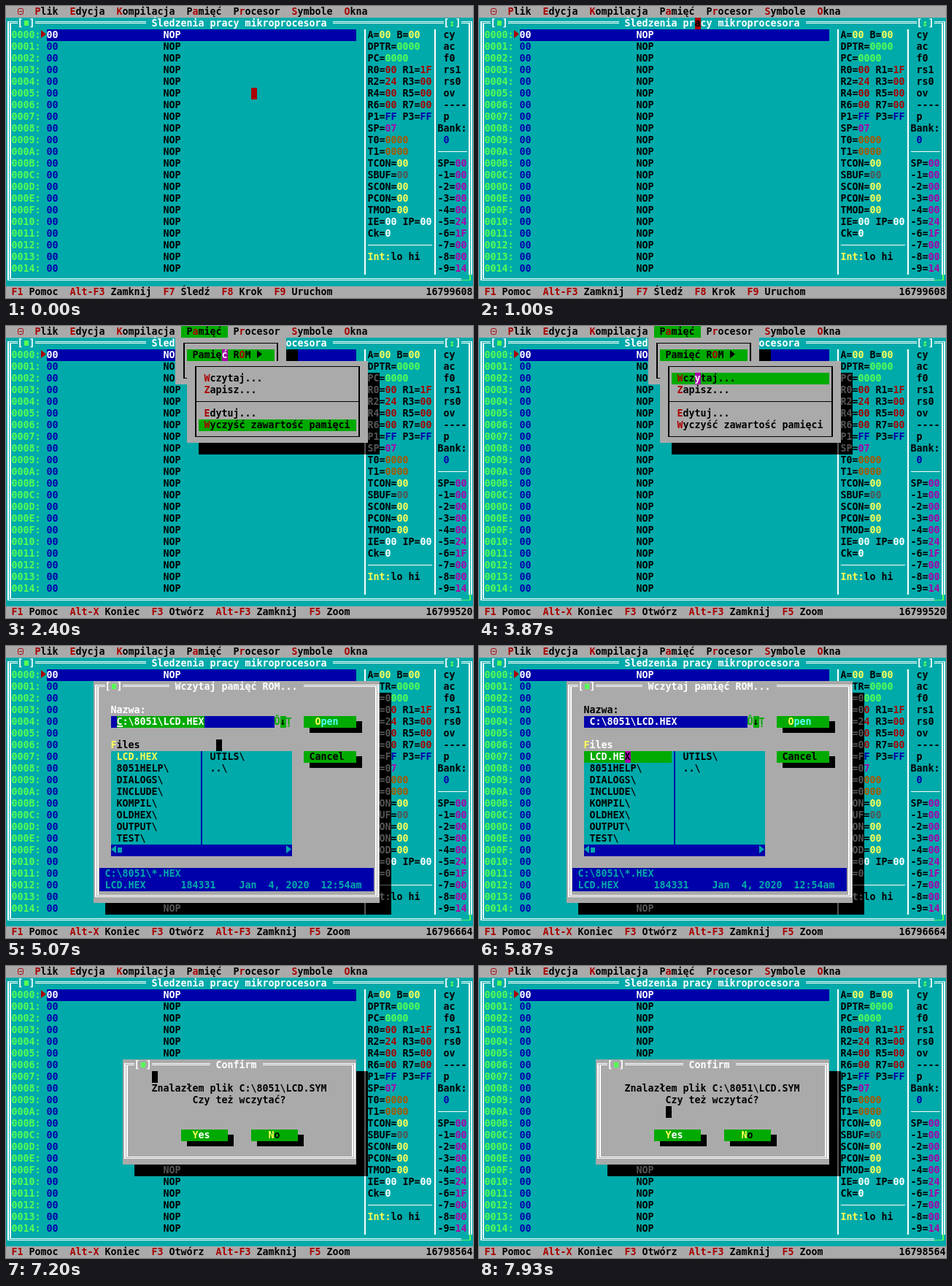
An HTML page with a canvas that plays this animation: 640x400 px, repeating every 8000 ms.

```html
<!DOCTYPE html>
<html lang="pl">
<head>
<meta charset="utf-8">
<title>Text mode debugger</title>
<style>
  html, body { margin: 0; width: 100%; height: 100%; overflow: hidden; background: #0aa; }
  canvas { display: block; width: 640px; height: 400px; }
</style>
</head>
<body>
<canvas id="screen" width="640" height="400"></canvas>
<script>
const COLS = 80, ROWS = 25, CW = 8, CH = 16;
const LOOP = 8000, TICK = 1000 / 15;

const PALETTE = ['#000', '#00a', '#0a0', '#0aa', '#a00', '#a0a', '#a50', '#aaa',
                 '#555', '#55f', '#5f5', '#5ff', '#f55', '#f5f', '#ff5', '#fff'];
const BLACK = 0, BLUE = 1, GREEN = 2, CYAN = 3, RED = 4, MAGENTA = 5, BROWN = 6, GRAY = 7,
      DARK = 8, LIME = 10, AQUA = 11, YELLOW = 14, WHITE = 15;

// Line characters: directions, then the joint of each stroke inside the cell.
const LINES = {
  '─': ['lr', 3, 7], '│': ['ud', 3, 7], '┌': ['rd', 3, 7], '┐': ['ld', 3, 7],
  '└': ['ru', 3, 7], '┘': ['lu', 3, 7], '├': ['udr', 3, 7], '┤': ['udl', 3, 7],
  '═': ['lr', 3, 5, 3, 7], '║': ['ud', 2, 7, 5, 7],
  '╔': ['rd', 2, 5, 5, 7], '╗': ['ld', 5, 5, 2, 7],
  '╚': ['ru', 2, 7, 5, 5], '╝': ['lu', 5, 7, 2, 5]
};
const BLOCKS = { '■': [1, 4, 6, 7], '▄': [0, 7, 8, 9], '▀': [0, 0, 8, 7] };

// Mouse pointer: tick, column, row.
const MOUSE = [
  [0, 42, 7], [7, 41, 7], [9, 40, 6],
  [12, 39, 5], [13, 38, 3], [14, 38, 2], [15, 37, 1], [16, 36, 0], [17, 35, 0],
  [22, 34, 0], [26, 36, 1], [27, 37, 2],
  [43, 38, 3], [44, 38, 5], [45, 39, 6], [48, 39, 7],
  [51, 39, 6], [52, 38, 5], [53, 38, 4], [54, 37, 4],
  [64, 38, 4], [65, 41, 5], [66, 45, 5], [67, 50, 6], [68, 52, 6], [69, 53, 6],
  [71, 51, 6], [72, 48, 7], [73, 44, 7], [74, 40, 7], [75, 37, 8], [76, 36, 8],
  [78, 35, 8], [79, 34, 8], [80, 32, 8], [81, 30, 8], [82, 28, 9], [83, 27, 9], [84, 26, 9], [85, 25, 9],
  [115, 26, 9], [116, 27, 10], [117, 29, 11], [118, 31, 11], [119, 32, 12]
];
const MEMORY = [[0, 16799608], [19, 16799564], [36, 16799520], [60, 16799608], [61, 16796664], [108, 16798564]];

const ctx = document.getElementById('screen').getContext('2d');
const cells = Array.from({ length: COLS * ROWS }, () => ({ ch: ' ', fg: 0, bg: 0 }));
const cell = (c, r) => cells[r * COLS + c];
const latest = (table, tick) => table.filter(step => step[0] <= tick).pop();

function fill(c, r, w, h, bg, ch = ' ', fg = BLACK) {
  for (let y = r; y < r + h; y++)
    for (let x = c; x < c + w; x++) Object.assign(cell(x, y), { ch, fg, bg });
}

// Text between tildes takes the hot colour; the background stays.
function put(c, r, text, fg = BLACK, hot = RED) {
  let isHot = false;
  for (const ch of text) {
    if (ch === '~') isHot = !isHot;
    else Object.assign(cell(c++, r), { ch, fg: isHot ? hot : fg });
  }
}

function tint(c, r, w, bg) {
  for (let x = c; x < c + w; x++) cell(x, r).bg = bg;
}

function shadow(c, r, w, h) {
  const dim = (x, y) => Object.assign(cell(x, y), { fg: DARK, bg: BLACK });
  for (let y = r + 1; y <= r + h; y++) { dim(c + w, y); dim(c + w + 1, y); }
  for (let x = c + 2; x < c + w; x++) dim(x, r + h);
}

function border(c, r, w, h, set, fg) {
  const [tl, tr, bl, br, hor, ver] = set;
  put(c, r, tl + hor.repeat(w - 2) + tr, fg);
  for (let y = r + 1; y < r + h - 1; y++) { put(c, y, ver, fg); put(c + w - 1, y, ver, fg); }
  put(c, r + h - 1, bl + hor.repeat(w - 2) + br, fg);
}

function makeWindow(c, r, w, h, bg, titleCol, title) {
  fill(c, r, w, h, bg);
  border(c, r, w, h, '╔╗╚╝═║', WHITE);
  put(c + 2, r, '[~■~]', WHITE, LIME);
  put(titleCol - 1, r, ` ${title} `, WHITE);
}

function menuBox(c, r, w, h) {
  shadow(c, r, w, h);
  fill(c, r, w, h, GRAY);
  border(c + 1, r, w - 2, h, '┌┐└┘─│', BLACK);
}

function button(c, r, w, textCol, text, fg) {
  fill(c, r, w, 1, GREEN);
  put(textCol, r, text, fg, YELLOW);
  put(c + w, r, '▄');
  put(c + 1, r + 1, '▀'.repeat(w));
}

function desktop(tick) {
  fill(0, 0, COLS, 1, GRAY);
  put(2, 0, '~⊟~  ~P~lik  ~E~dycja  ~K~ompilacja  P~a~mięć  P~r~ocesor  ~S~ymbole  ~O~kna');

  makeWindow(0, 1, 80, 23, CYAN, 25, 'Śledzenia pracy mikroprocesora');
  put(75, 1, '[~↕~]', WHITE, LIME);
  put(78, 23, '─┘', LIME);

  for (let i = 0; i < 21; i++) {
    put(1, i + 2, i.toString(16).toUpperCase().padStart(4, '0') + ':', LIME);
    put(7, i + 2, '00', i ? BLUE : WHITE);
    put(27, i + 2, 'NOP', i ? BLACK : WHITE);
    put(61, i + 2, '│', WHITE);
    put(73, i + 2, '│', WHITE);
  }
  tint(7, 2, 53, BLUE);
  put(6, 2, '►', RED);

  const registers = [
    ['A=~00~ B=~00~', YELLOW], ['DPTR=~0000~', LIME], ['PC=~0000~', LIME],
    ['R0=~00~ R1=~1F~', RED], ['R2=~24~ R3=~00~', RED], ['R4=~00~ R5=~00~', RED], ['R6=~00~ R7=~00~', RED],
    ['P1=~FF~ P3=~FF~', BLUE], ['SP=~07~', MAGENTA], ['T0=~0000~', BROWN], ['T1=~0000~', BROWN],
    ['TCON=~00~', YELLOW], ['SBUF=~00~', DARK], ['SCON=~00~', YELLOW], ['PCON=~00~', YELLOW],
    ['TMOD=~00~', YELLOW], ['IE=~00~ IP=~00~', WHITE], ['Ck=~0~', WHITE],
    ['~───────────~', WHITE], ['~Int:~lo hi', YELLOW]
  ];
  registers.forEach(([text, hot], i) => put(62, i + 2, text, BLACK, hot));

  ['cy', 'ac', 'f0', 'rs1', 'rs0', 'ov', '----', 'p'].forEach((flag, i) => put(75, i + 2, flag));
  put(74, 10, 'Bank:');
  put(75, 11, '0', BLUE);
  put(74, 12, '─────', WHITE);
  ['00', '00', '00', '00', '00', '24', '1F', '00', '00', '14'].forEach((value, i) =>
    put(74, i + 13, `${i ? '-' + i : 'SP'}=~${value}~`, BLACK, MAGENTA));

  fill(0, 24, COLS, 1, GRAY);
  put(1, 24, tick < 19
    ? '~F1~ Pomoc  ~Alt-F3~ Zamknij  ~F7~ Śledź  ~F8~ Krok  ~F9~ Uruchom'
    : '~F1~ Pomoc  ~Alt-X~ Koniec  ~F3~ Otwórz  ~Alt-F3~ Zamknij  ~F5~ Zoom');
  put(72, 24, String(latest(MEMORY, tick)[1]));
}

function memoryMenu(tick) {
  tint(30, 0, 8, GREEN);
  menuBox(29, 1, 19, 4);
  put(32, 2, 'Pamięć R~O~M ►');
  put(32, 3, 'Pamięć R~A~M ►');
  if (tick >= 20) tint(31, 2, 15, GREEN);
  if (tick < 36) return;

  menuBox(31, 3, 31, 7);
  put(34, 4, '~W~czytaj...');
  put(34, 5, '~Z~apisz...');
  put(32, 6, '├' + '─'.repeat(27) + '┤');
  put(34, 7, '~E~dytuj...');
  put(34, 8, '~W~yczyść zawartość pamięci');
  tint(33, tick < 58 ? 8 : 4, 27, GREEN);
}

function fileDialog(tick) {
  const inList = tick >= 88;
  shadow(15, 3, 49, 19);
  makeWindow(15, 3, 49, 19, GRAY, 29, 'Wczytaj pamięć ROM...');

  put(18, 5, 'Nazwa:', inList ? BLACK : WHITE);
  fill(18, 6, 28, 1, BLUE);
  put(19, 6, 'C:\\8051\\LCD.HEX', WHITE);
  if (!inList) tint(19, 6, 15, GREEN);
  put(46, 6, 'Ů~↓~Ţ', GREEN, BLACK);
  tint(47, 6, 1, GREEN);
  button(51, 6, 9, 53, '~O~pen', AQUA);
  button(51, 9, 9, 52, 'Cancel', BLACK);

  put(18, 8, '~F~iles', inList ? WHITE : BLACK, YELLOW);
  fill(18, 9, 31, 8, CYAN);
  ['LCD.HEX', '8051HELP\\', 'DIALOGS\\', 'INCLUDE\\', 'KOMPIL\\', 'OLDHEX\\', 'OUTPUT\\', 'TEST\\']
    .forEach((name, i) => {
      put(19, i + 9, name, i ? BLACK : inList ? WHITE : YELLOW);
      put(33, i + 9, '│', BLUE);
    });
  if (inList) tint(18, 9, 15, GREEN);
  put(35, 9, 'UTILS\\');
  put(35, 10, '..\\');
  fill(18, 17, 31, 1, BLUE);
  put(18, 17, '◄■', CYAN);
  put(48, 17, '►', CYAN);

  fill(16, 19, 47, 2, BLUE);
  put(17, 19, 'C:\\8051\\*.HEX', CYAN);
  put(17, 20, 'LCD.HEX      184331    Jan  4, 2020  12:54am', CYAN);
}

function confirmDialog() {
  shadow(20, 8, 40, 9);
  makeWindow(20, 8, 40, 9, GRAY, 36, 'Confirm');
  put(25, 10, 'Znalazłem plik C:\\8051\\LCD.SYM');
  put(32, 11, 'Czy też wczytać?');
  button(30, 14, 8, 32, '~Y~es', WHITE);
  button(42, 14, 8, 45, '~N~o', BLACK);
}

function strokes(x, y, [dirs, ...joints]) {
  for (let i = 0; i < joints.length; i += 2) {
    const [jx, jy] = joints.slice(i, i + 2);
    const parts = {
      l: [0, jy, jx + 2, 1], r: [jx, jy, CW - jx, 1],
      u: [jx, 0, 2, jy + 1], d: [jx, jy, 2, CH - jy]
    };
    for (const dir of dirs) {
      const [px, py, w, h] = parts[dir];
      ctx.fillRect(x + px, y + py, w, h);
    }
  }
}

function triangle(x, y, back, tip) {
  ctx.beginPath();
  ctx.moveTo(x + back, y + 1);
  ctx.lineTo(x + tip, y + 6.5);
  ctx.lineTo(x + back, y + 12);
  ctx.fill();
}

function drawGlyph(ch, x, y) {
  if (LINES[ch]) strokes(x, y, LINES[ch]);
  else if (BLOCKS[ch]) {
    const [bx, by, w, h] = BLOCKS[ch];
    ctx.fillRect(x + bx, y + by, w, h);
  } else if (ch === '►') triangle(x, y, 0, 7);
  else if (ch === '◄') triangle(x, y, 7, 0);
  else if (ch === '⊟') {
    ctx.beginPath();
    ctx.roundRect(x + 0.5, y + 3.5, 7, 8, 2);
    ctx.stroke();
    ctx.fillRect(x + 2, y + 7, 4, 1);
  } else if (ch !== ' ') ctx.fillText(ch, x - 0.4, y + 12);
}

function render(tick) {
  desktop(tick);
  if (tick >= 19 && tick < 60) memoryMenu(tick);
  if (tick >= 61 && tick < 91) fileDialog(tick);
  if (tick >= 108) confirmDialog();

  const [, mx, my] = latest(MOUSE, tick);
  const under = cell(mx, my);
  under.fg ^= 15;
  under.bg ^= 7;

  ctx.font = 'bold 13.3px "DejaVu Sans Mono", monospace';
  cells.forEach(({ bg }, i) => {
    ctx.fillStyle = PALETTE[bg];
    ctx.fillRect(i % COLS * CW, Math.floor(i / COLS) * CH, CW, CH);
  });
  cells.forEach(({ ch, fg }, i) => {
    ctx.fillStyle = ctx.strokeStyle = PALETTE[fg];
    drawGlyph(ch, i % COLS * CW, Math.floor(i / COLS) * CH);
  });

  // Blinking text cursor of the input line
  if (tick >= 62 && tick < 88 && tick % 4 < 2) {
    ctx.fillStyle = PALETTE[WHITE];
    ctx.fillRect(152, 109, 8, 2);
  }
}

const start = performance.now();
let shown = -1;
function frame() {
  const time = (performance.now() - start) % LOOP;
  const tick = Math.floor((time + 5) / TICK) % 120;
  if (tick !== shown) render(shown = tick);
  requestAnimationFrame(frame);
}
frame();
</script>
</body>
</html>
```
